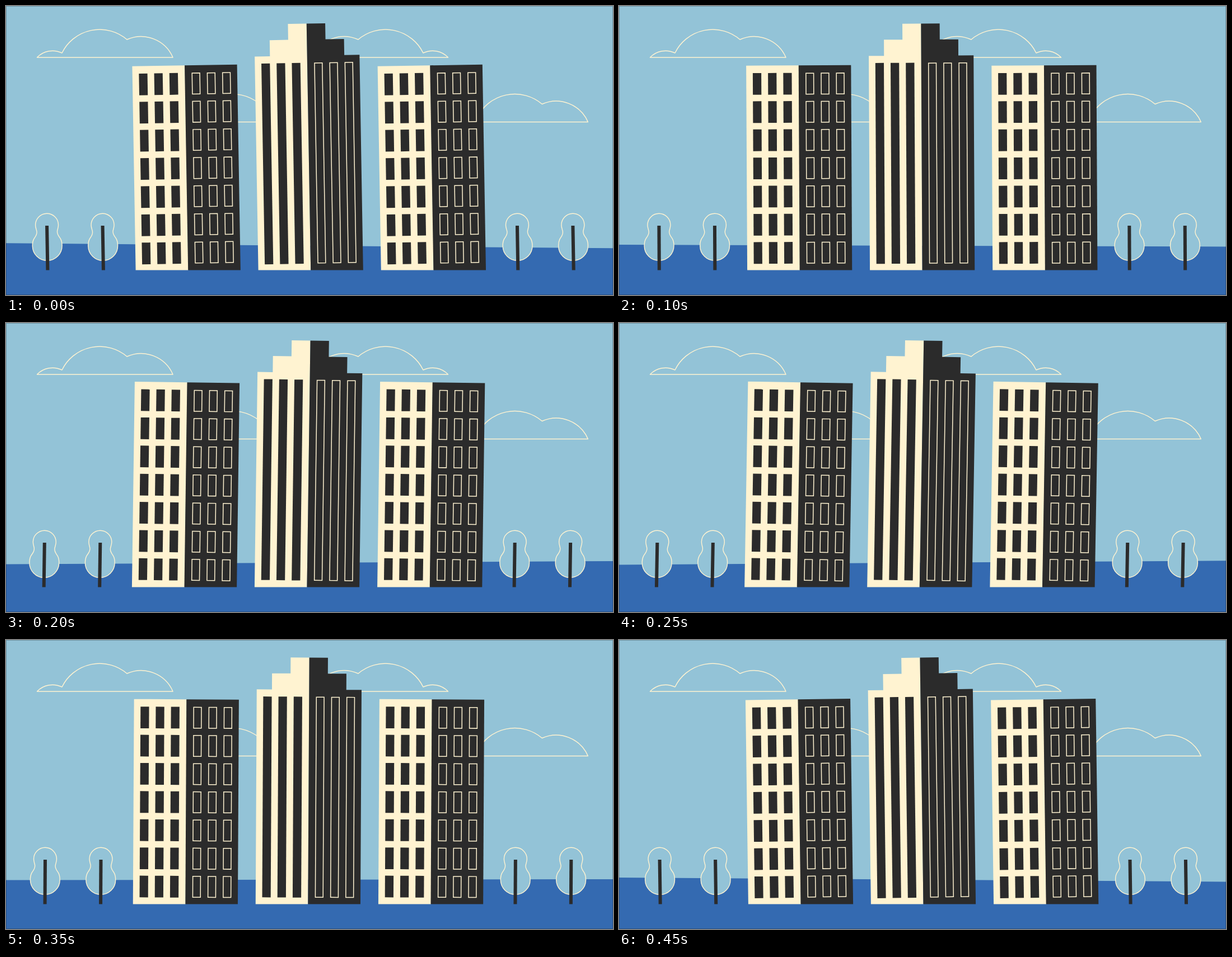
These frames come from a looping animation (1084x517 px, 500 ms). An HTML page:

```html
<!DOCTYPE html>
<html lang="en">
<head>
<meta charset="utf-8">
<title>City sway</title>
<style>
  html, body { margin: 0; width: 100%; height: 100%; overflow: hidden; background: #93c3d7; }
  svg { display: block; width: 1084px; height: 517px; }
  .sky { fill: #93c3d7; }
  .ground { fill: #346ab1; }
  .cream { fill: #fff3d1; }
  .dark { fill: #2b2b2b; }
  .line { fill: none; stroke: #fff3d1; stroke-width: 1.5; }
  .crown { fill: #93c3d7; stroke: #fff3d1; stroke-width: 1.4; }
  .edge { fill: none; stroke: #000; stroke-opacity: .25; }
</style>
</head>
<body>
<svg viewBox="0 0 1084 517">
  <defs>
    <clipPath id="base"><rect width="1084" height="472.5"/></clipPath>
    <path id="cloud" class="line" stroke-linejoin="round"
      d="M55.5 92A38.5 38.5 0 0 1 100 84A75 75 0 0 1 216 60A62 62 0 0 1 298 92Z"/>
    <g id="tree">
      <path class="crown" d="M-20.5 391.8A20.5 20.5 0 0 1 20.5 391.8C20.5 396 18.8 400 18.3 403
        C17.5 409 21 412 24 417C25.8 420.5 26.4 425 26.4 429A26.4 26.4 0 0 1 -26.4 429
        C-26.4 425 -25.8 420.5 -24 417C-21 412 -17.5 409 -18.3 403C-18.8 400 -20.5 396 -20.5 391.8Z"/>
      <rect class="dark" x="-3" y="393" width="6" height="90"/>
    </g>
  </defs>
  <rect class="sky" width="1084" height="517"/>
  <use href="#cloud"/>
  <use href="#cloud" transform="translate(845 0) scale(-1 1)"/>
  <use href="#cloud" transform="translate(572 115.5) scale(-1 1)"/>
  <use href="#cloud" transform="translate(741.3 115.5)"/>
  <rect id="ground" class="ground" x="-40" y="428.8" width="1164" height="140"/>
  <g id="town" clip-path="url(#base)"></g>
  <rect class="edge" x=".5" y=".5" width="1083" height="516"/>
</svg>
<script>
const STEP = 50, STEPS = 10;
const PIVOT_Y = 253, SWAY = 0.97;
const town = document.getElementById('town');
const ground = document.getElementById('ground');
const columns = [0, 1, 2];

const rect = (cls, x, y, w, h) =>
  `<rect class="${cls}" x="${x}" y="${y}" width="${w}" height="${h}"/>`;

// One row of openings: solid on the light side, outlined on the dark side.
function openings(y, h) {
  return columns.map(i => {
    const dx = i * 27.2;
    return rect('dark', -81.9 + dx, y, 15.2, h) +
      rect('line', 13 + dx, y + 0.7, 13.8, h - 1.4);
  }).join('');
}

function block() {
  let rows = '';
  for (let r = 0; r < 7; r++) rows += openings(119.6 + r * 50.4, 38.8);
  return rect('cream', -93.6, 106.2, 94, 374) + rect('dark', 0, 106.2, 93.6, 374) + rows;
}

function tower() {
  const half = s => `M0 31.5H${s * 33.3}V60H${s * 66.4}V88.8H${s * 93.6}V480H0Z`;
  return `<path class="cream" d="${half(-1)}"/><path class="dark" d="${half(1)}"/>` +
    openings(101.5, 359.3);
}

const tree = '<use href="#tree"/>';
const parts = [
  [70.7, tree], [170.2, tree], [910.6, tree], [1010, tree],
  [321.5, block()], [540.5, tower()], [759.7, block()]
];
town.innerHTML = parts.map(([x, art]) => `<g transform="translate(${x} 0)"><g>${art}</g></g>`).join('');
const swaying = [...town.children].map(g => g.firstElementChild);

function draw(time) {
  const step = Math.floor(time / STEP) % STEPS;
  const c = Math.cos(2 * Math.PI * step / STEPS);
  for (const g of swaying) g.setAttribute('transform', `rotate(${-SWAY * c} 0 ${PIVOT_Y})`);
  ground.setAttribute('transform', `rotate(${0.05 + 0.43 * c} 542 428.8)`);
}

const start = performance.now();
function tick(now) {
  draw(Math.max(0, now - start));
  requestAnimationFrame(tick);
}
draw(0);
requestAnimationFrame(tick);
</script>
</body>
</html>
```
